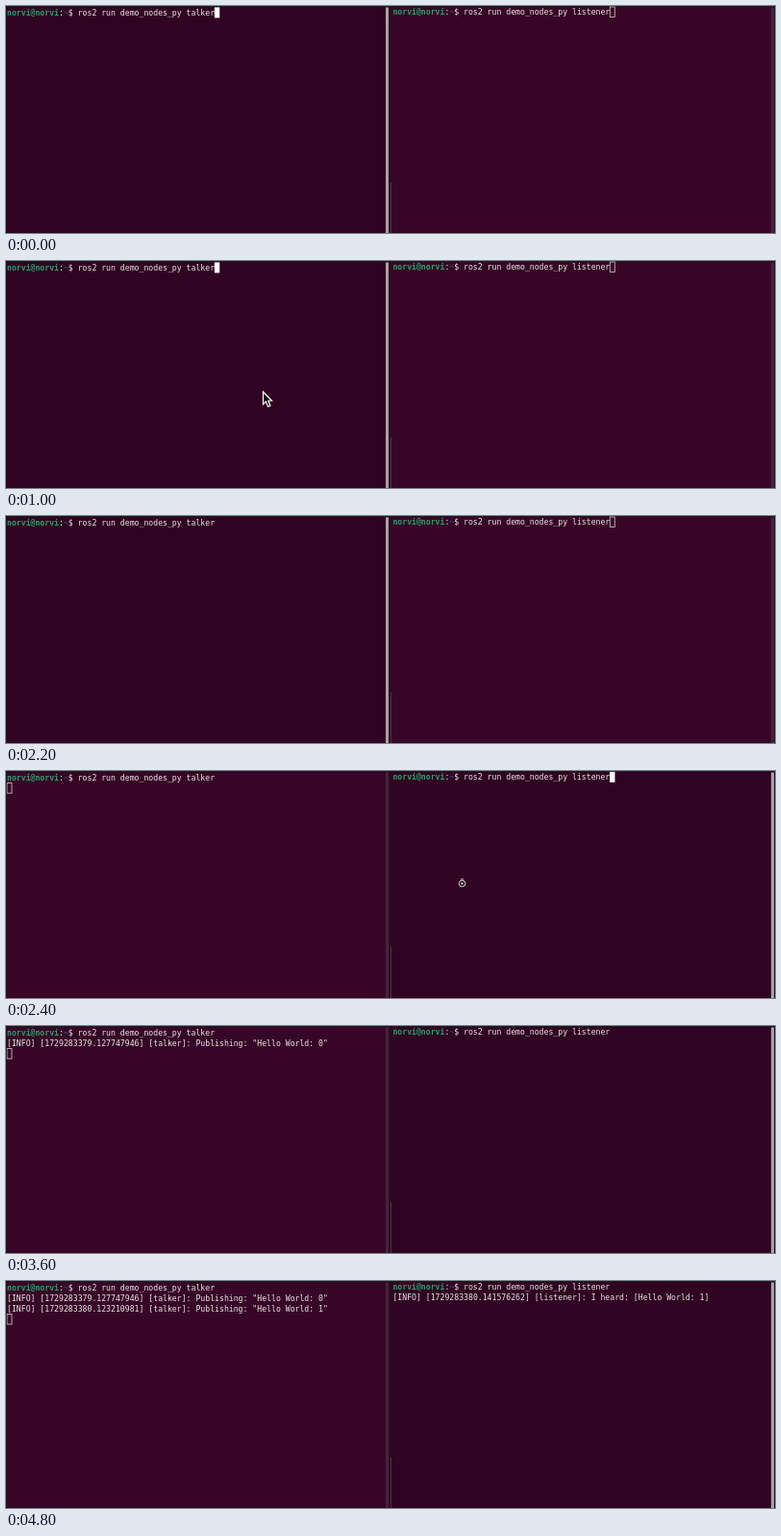
Animation, 800 px wide and 237 px high, one loop 5000 ms. Source, as an HTML page with a canvas:

```html
<!DOCTYPE html>
<html lang="en">
<head>
<meta charset="utf-8">
<title>Talker and listener</title>
<style>
  html, body { margin: 0; width: 100%; height: 100%; overflow: hidden; background: #300322; }
  canvas { display: block; }
</style>
</head>
<body>
<canvas id="stage" width="800" height="237"></canvas>
<script>
const ctx = document.getElementById('stage').getContext('2d');
const LOOP = 5000, STEP = 200;
const FONT = '8.16px "DejaVu Sans Mono", "Noto Sans Mono", monospace';
const CELL = 4.91, ROW = 11;
const TEXT = '#ece4e8';
const PROMPT = [['norvi@norvi', '#26a269', true], [':', TEXT], ['~', '#2a4a80', true], ['$ ', TEXT]];

const talker = {
  x: 1, top: 1.4, left: 0, width: 398, bar: 395,
  command: 'ros2 run demo_nodes_py talker',
  enter: 1600,
  output: [
    [3000, '[INFO] [1729283379.127747946] [talker]: Publishing: "Hello World: 0"'],
    [4000, '[INFO] [1729283380.123210981] [talker]: Publishing: "Hello World: 1"'],
  ],
  hasFocus: t => t < 2400,
  cursorOn: t => t < 2200,
};

const listener = {
  x: 402.4, top: 0.8, left: 401, width: 399, bar: 796,
  command: 'ros2 run demo_nodes_py listener',
  enter: 2800,
  output: [[4000, '[INFO] [1729283380.141576262] [listener]: I heard: [Hello World: 1]']],
  hasFocus: t => t >= 2400,
  cursorOn: t => t < 2800 || (t - 2800) % 1200 < 600,
};

// Mouse states: start, end, shape, x, y
const mouse = [
  [600, 800, drawArrow, 468, 180],
  [800, 1000, drawArrow, 304, 137],
  [1000, 1200, drawArrow, 267, 136],
  [1200, 1600, drawArrow, 261, 123],
  [2400, 2800, drawRing, 474.5, 117.5],
  [4000, 4200, drawBeam, 474, 127],
  [4200, 4400, drawBeam, 474, 219],
];

function rect(x, y, w, h, color) {
  ctx.fillStyle = color;
  ctx.fillRect(x, y, w, h);
}

function drawTerminal(pane, t) {
  const focused = pane.hasFocus(t);
  rect(pane.left, 1, pane.width, 236, focused ? '#300322' : '#370627');
  rect(pane.bar, 1.5, 3, 235.5, focused ? '#aaa0a6' : '#47223c');

  const write = (string, column, row, color = TEXT, bold = false) => {
    ctx.font = (bold ? 'bold ' : '') + FONT;
    ctx.fillStyle = color;
    ctx.fillText(string, pane.x + column * CELL, pane.top + 8.4 + row * ROW);
  };

  let column = 0;
  for (const [part, color, bold] of PROMPT) {
    write(part, column, 0, color, bold);
    column += part.length;
  }
  write(pane.command, column, 0);

  const lines = pane.output.filter(([time]) => t >= time);
  lines.forEach(([, line], i) => write(line, 0, i + 1));

  const entered = t >= pane.enter;
  const x = pane.x + (entered ? 0 : (column + pane.command.length) * CELL);
  const y = pane.top + (entered ? lines.length + 1 : 0) * ROW;
  if (!focused) {
    ctx.strokeStyle = '#d6cad1';
    ctx.lineWidth = 0.8;
    ctx.strokeRect(x, y + 0.2, 5, 10.5);
  } else if (pane.cursorOn(t)) {
    rect(x - 0.2, y, 5.4, ROW, '#fff');
  }
}

function drawArrow(x, y) {
  const path = new Path2D('M.5 .5V13.5L3.4 10.8L5.6 16L8 15L5.8 10H9.6Z');
  ctx.save();
  ctx.translate(x, y);
  ctx.fillStyle = '#111';
  ctx.strokeStyle = '#fff';
  ctx.lineWidth = 1.2;
  ctx.fill(path);
  ctx.stroke(path);
  ctx.restore();
}

function drawRing(x, y) {
  ctx.beginPath();
  ctx.arc(x, y, 3.3, 0, 7);
  ctx.fillStyle = '#1c1519';
  ctx.fill();
  ctx.strokeStyle = '#d8d0d4';
  ctx.lineWidth = 1;
  ctx.stroke();
  rect(x - 1, y - 1, 2, 2, '#eee');
  rect(x - 1.5, y - 5, 3, 1, '#d8d0d4');
}

function drawBeam(x, y) {
  const path = new Path2D('M-2 -3.5H2M0 -3.5V3.5M-2 3.5H2');
  ctx.save();
  ctx.translate(x, y);
  for (const [width, color] of [[2.4, '#151015'], [1, '#ddd']]) {
    ctx.lineWidth = width;
    ctx.strokeStyle = color;
    ctx.stroke(path);
  }
  ctx.restore();
}

function render(now) {
  const t = Math.floor(now % LOOP / STEP) * STEP;
  rect(0, 0, 800, 237, '#1e1a1d');
  drawTerminal(talker, t);
  drawTerminal(listener, t);
  rect(0, 1, 0.6, 236, '#1e1a1d');
  rect(799.2, 1, 0.8, 236, '#1e1a1d');
  rect(398, 1, 3, 236, '#2a0a20');
  rect(400, 184, 1, 53, '#48333f');
  for (const [start, end, draw, x, y] of mouse) {
    if (t >= start && t < end) draw(x, y);
  }
}

const startTime = performance.now();
function tick() {
  render(performance.now() - startTime);
  requestAnimationFrame(tick);
}
tick();
</script>
</body>
</html>
```
